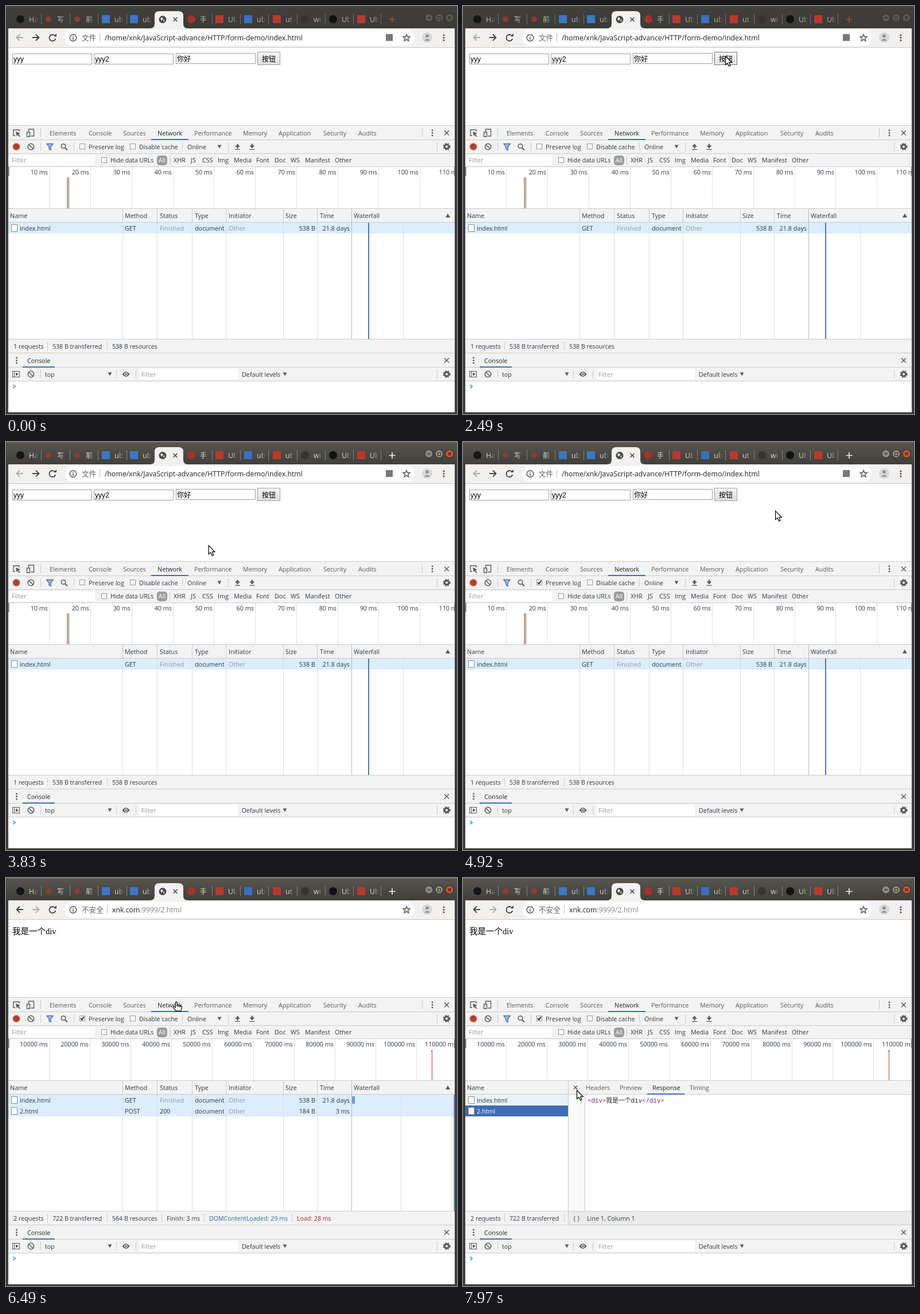
An HTML page with a canvas for the animation above (8000 ms loop, 786x712 px).

```html
<!DOCTYPE html>
<html>
<head>
<meta charset="utf-8">
<style>
html, body { margin: 0; width: 100%; height: 100%; overflow: hidden; background: #3c3b37; }
canvas { display: block; }
</style>
</head>
<body>
<canvas id="stage" width="786" height="712"></canvas>
<script>
const g = document.getElementById('stage').getContext('2d');
const CJK = '"Noto Sans CJK SC", "Noto Sans CJK JP", sans-serif';
const UI = '"Open Sans", ' + CJK;
const SANS = '"Liberation Sans", ' + CJK;
const SERIF = '"Liberation Serif", "Noto Sans CJK SC", serif';
const MONO = '"Noto Sans Mono", "Noto Sans CJK SC", monospace';
const INK = '#303942', ICON = '#5a5a5a', BAR = '#f3f3f3', EDGE = '#ccc', BLUE = '#3f6cb5';

function rect(x, y, w, h, color) {
  g.fillStyle = color;
  g.fillRect(x, y, w, h);
}
function frame(x, y, w, h, color) {
  g.strokeStyle = color;
  g.lineWidth = 1;
  g.strokeRect(x + .5, y + .5, w - 1, h - 1);
}
function round(x, y, w, h, r, color) {
  g.beginPath();
  g.roundRect(x, y, w, h, r);
  g.fillStyle = color;
  g.fill();
}
function disc(x, y, r, color) {
  g.beginPath();
  g.arc(x, y, r, 0, 7);
  g.fillStyle = color;
  g.fill();
}
function ring(x, y, r, color, width = 1.5, from = 0, to = 7) {
  g.beginPath();
  g.arc(x, y, r, from, to);
  g.strokeStyle = color;
  g.lineWidth = width;
  g.stroke();
}
function path(d, x, y, stroke, width = 1.5, fill) {
  const p = new Path2D(d);
  g.save();
  g.translate(x, y);
  if (fill) { g.fillStyle = fill; g.fill(p); }
  if (stroke) { g.strokeStyle = stroke; g.lineWidth = width; g.stroke(p); }
  g.restore();
}
function text(s, x, y, color = INK, size = 10.8, align = 'left', font = UI) {
  g.font = size + 'px ' + font;
  g.textAlign = align;
  g.fillStyle = color;
  g.fillText(s, x, y);
  return x + g.measureText(s).width;
}
const vline = (x, y, h, color = EDGE) => rect(x, y, 1, h, color);
const hline = (y, color = EDGE) => rect(4, y, 778, 1, color);

function gear(x, y) {
  ring(x, y, 3.6, ICON, 3);
  g.setLineDash([2.4, 2.1]);
  ring(x, y, 5.5, ICON, 2);
  g.setLineDash([]);
}
function dots(x, y, color = ICON) {
  for (const d of [-4.5, 0, 4.5]) disc(x, y + d, 1.4, color);
}
const cross = (x, y, r, color = ICON) => path(`M${-r} ${-r}L${r} ${r}M${r} ${-r}L${-r} ${r}`, x, y, color);
const caret = (x, y) => path('M-3.5 -3H3.5L0 3Z', x, y, null, 0, ICON);
function forbid(x, y) {
  ring(x, y, 5.2, ICON);
  path('M-3.7 -3.7L3.7 3.7', x, y, ICON);
}
function checkbox(x, y, on) {
  round(x, y, 10, 10, 2, '#fafafa');
  frame(x, y, 10, 10, '#9a9a9a');
  if (on) path('M2 5L4.3 7.5L8 2', x, y, '#222', 1.8);
}

// Title strip: [icon centre, title, icon colour, icon is square]
const tabs = [
  [25, 'Ha', '#151515'], [74, '写', '#8e3c33'], [124, '前', '#8e3c33'],
  [174, 'ub', '#3a78c8', 1], [223, 'ub', '#3a78c8', 1], [323, '手', '#a8322a'],
  [372, 'Ub', '#b83a2e', 1], [422, 'ub', '#3b6fc0', 1], [472, 'ut', '#b83a2e', 1],
  [521, 'wi', '#353430'], [570, 'Ub', '#111'], [619, 'Ub', '#b83a2e', 1]
];

function titleBar(focused) {
  const bg = g.createLinearGradient(0, 0, 0, 39);
  bg.addColorStop(0, focused ? '#57554e' : '#403f3b');
  bg.addColorStop(1, focused ? '#403f3a' : '#3c3b37');
  rect(0, 0, 786, 39, bg);
  rect(0, 0, 786, 1, focused ? '#6b6963' : '#55544f');
  for (const [x, title, color, square] of tabs) {
    if (square) rect(x - 7, 16, 14, 14, color);
    else disc(x, 23, color == '#8e3c33' ? 5 : 7, color);
    const fade = g.createLinearGradient(x + 15, 0, x + 31, 0);
    fade.addColorStop(.35, focused ? '#dfdbd2' : '#bdbab2');
    fade.addColorStop(1, '#dfdbd200');
    g.save();
    g.beginPath();
    g.rect(x, 8, 32, 30);
    g.clip();
    text(title, x + 15, 28, fade, 12.5);
    g.restore();
  }
  for (const x of [61, 111, 160, 210, 359, 408, 457, 507, 556, 605, 653])
    vline(x, 14, 18, focused ? '#85827a' : '#716f69');
  path('M251 39Q259 39 259 31V17Q259 9 267 9H301Q309 9 309 17V31Q309 39 317 39Z', 0, 0, null, 0, '#f2f1f0');
  disc(273, 23.5, 6.5, '#4a4a4a');
  path('M-4 -2L-1 -4L1 -1L-2 2ZM1 1L4 0L2 4Z', 273, 23.5, null, 0, '#f2f1f0');
  cross(295, 23.5, 3.5, '#444');
  path('M-5.5 0H5.5M0 -5.5V5.5', 673, 23.5, focused ? '#eee' : '#a8443b', 1.7);
  for (const x of [737, 755, 773]) {
    disc(x, 20.5, 7.5, '#33322e');
    disc(x, 20.5, 6.5, focused ? (x == 773 ? '#d9502f' : '#8c897f') : '#595852');
  }
  const mark = '#35342f';
  path('M-3 0H3', 737, 20.5, mark);
  frame(752, 18, 6, 6, mark);
  cross(773, 20.5, 2.6, mark);
}

function addressBar(loaded) {
  rect(4, 39, 778, 33, '#f2f1f0');
  round(103, 42, 609, 27, 13.5, '#fff');
  hline(72, '#c9c8c6');
  const dark = '#444', pale = '#aaa';
  path('M6 0H-5M0 -5.5L-5.5 0L0 5.5', 24, 55, loaded ? dark : pale, 1.8);
  path('M-6 0H5M0 -5.5L5.5 0L0 5.5', 52, 55, loaded ? pale : dark, 1.8);
  ring(81, 55.5, 5.5, dark, 1.8, .3, 5.5);
  path('M2 -1H7V-6Z', 81, 54, null, 0, dark);
  ring(117, 55.5, 5.8, '#555', 1.4);
  rect(116.3, 54.5, 1.5, 4.5, '#555');
  rect(116.3, 52, 1.5, 1.5, '#555');
  if (loaded) {
    text('不安全', 132, 60, '#5f6368', 12.6);
    vline(176, 48, 14, '#bbb');
    const x = text('xnk.com', 185, 59.5, '#222', 12.3);
    text(':9999/2.html', x, 59.5, '#80868b', 12.3);
  } else {
    text('文件', 132, 60, '#5f6368', 12.6);
    vline(163, 48, 14, '#bbb');
    text('/home/xnk/JavaScript-advance/HTTP/form-demo/index.html', 172, 59.5, '#222', 12.3);
    rect(662, 49, 12, 12, '#75797e');
  }
  path('M0 -6L1.7 -2H6L2.6 .9L3.8 5.3L0 2.8L-3.8 5.3L-2.6 .9L-6 -2H-1.7Z', 698, 55.5, '#555', 1.4);
  disc(734, 55, 9, '#d8d8d8');
  disc(734, 52.3, 2.8, '#909090');
  path('M-5.2 5Q0 -1 5.2 5Z', 734, 55.5, null, 0, '#909090');
  dots(763, 55.5, '#444');
}

function page(loaded, hover) {
  rect(4, 73, 778, 135, '#fff');
  if (loaded) {
    text('我是一个div', 11, 97.5, '#000', 14.5, 'left', SERIF);
    return;
  }
  [[11, 83, 'yyy'], [153, 83, 'yyy2'], [296, 82, '你好']].forEach(([x, y, s]) => {
    frame(x, y, 139, 19, '#a0a0a0');
    text(s, x + 2, 97, '#000', 12, 'left', SANS);
  });
  const face = g.createLinearGradient(0, 80, 0, 103);
  face.addColorStop(0, '#f6f6f6');
  face.addColorStop(1, hover ? '#e4e4e4' : '#dcdcdc');
  round(438, 80, 40, 23, 2, face);
  frame(438, 80, 40, 23, hover ? '#777' : '#a2a2a2');
  text('按钮', 458, 96.5, '#000', 12, 'center', SANS);
}

function toolbars(checked) {
  rect(4, 208, 778, 73, BAR);
  for (const y of [208, 233, 257, 280]) hline(y);

  path('M3 10H0V0H10V3', 13, 216, ICON, 1.4);
  path('M0 0L8 3.5L4.8 5L7.8 8.5L6.3 9.6L3.4 6L1.8 8.5Z', 17, 219, null, 0, ICON);
  path('M3 4V0H12V12H7M0 5H5V13H0Z', 36.5, 215, ICON, 1.4);
  vline(60, 214, 15);
  [['Elements', 76], ['Console', 144], ['Sources', 204], ['Network', 264], ['Performance', 328],
   ['Memory', 413], ['Application', 475], ['Security', 553], ['Audits', 614]]
    .forEach(([s, x]) => text(s, x, 226, s == 'Network' ? '#222' : '#5a5a5a'));
  rect(253, 232, 65, 2, BLUE);
  vline(725, 214, 15);
  dots(743, 221.5);
  cross(768, 221.5, 4);

  disc(18, 245.5, 7, '#e3b7b0');
  disc(18, 245.5, 5.8, '#b5402f');
  forbid(43.5, 245.5);
  vline(60, 238, 15);
  path('M-5.5 -5H5.5L1.5 0V6L-1.5 4V0Z', 76.5, 245.5, BLUE, 1.4, '#a9c6ee');
  ring(100, 244.5, 3.8, ICON);
  path('M3 3L7 7', 100, 244.5, ICON, 2);
  vline(118, 238, 15);
  checkbox(128, 240, checked);
  text('Preserve log', 144, 250);
  checkbox(216, 240);
  text('Disable cache', 232, 250, INK, 10.6);
  vline(307, 238, 15);
  text('Online', 316, 250);
  caret(372, 245.5);
  vline(387, 238, 15);
  const upload = 'M0 -5L4.5 0H1.3V3H-1.3V0H-4.5ZM-4.5 4.2H4.5V5.6H-4.5Z';
  path(upload, 403.5, 245.5, null, 0, ICON);
  path('M0 3L4.5 -2H1.3V-5H-1.3V-2H-4.5ZM-4.5 4.2H4.5V5.6H-4.5Z', 429, 245.5, null, 0, ICON);
  vline(751, 238, 15);
  gear(768, 245.5);

  rect(4, 260, 151, 18, '#fff');
  text('Filter', 10, 273, '#999');
  checkbox(166, 264);
  text('Hide data URLs', 182, 273, INK, 10.6);
  round(263, 261, 18, 17, 5, '#9b9b9b');
  text('All', 272, 273, '#fff', 10.8, 'center');
  vline(285, 262, 15);
  [['XHR', 292], ['JS', 322], ['CSS', 342], ['Img', 369], ['Media', 397], ['Font', 436],
   ['Doc', 468], ['WS', 496], ['Manifest', 521], ['Other', 573]].forEach(([s, x]) => text(s, x, 273));
}

function overview(loaded, guide) {
  rect(4, 281, 778, 72, '#fff');
  g.save();
  g.beginPath();
  g.rect(4, 281, 777, 72);
  g.clip();
  const gap = loaded ? 71.2 : 71.8;
  for (let i = 1; i < 12; i++) {
    const x = Math.round(3.3 + gap * i);
    vline(x, 281, 72, '#e1e1e1');
    text(i * (loaded ? 10000 : 10) + ' ms', x - 2, 294, INK, 10.8, 'right');
  }
  g.restore();
  rect(4, 281, 2, 16, '#999');
  rect(781, 281, 1, 16, '#999');
  if (loaded) {
    rect(742, 300, 1, 53, '#b5402f');
    rect(741, 301, 1, 2, '#777');
  } else {
    rect(106.5, 299, 1.3, 54, '#b04a44');
    vline(109, 299, 54, '#666');
  }
  if (guide) rect(guide - .7, 281, 1.6, 72, '#5b9bd5');
  hline(353);
}

function fileRow(y, cells, fill, ink) {
  rect(4, y, cells.length > 1 ? 778 : 179, 19, fill);
  rect(9, y + 3, 11, 13, '#fff');
  frame(9, y + 3, 11, 13, '#8e9296');
  const at = [24, 207, 268, 329, 388, 539, 599];
  cells.forEach((s, i) =>
    text(s, at[i], y + 13.5, /Fin|Oth/.test(s) ? '#999' : ink, 10.8, i > 4 ? 'right' : 'left'));
}

function requests(loaded, detail) {
  rect(4, 354, 778, 227, '#fff');
  rect(4, 354, 778, 23, BAR);
  const first = ['index.html', 'GET', 'Finished', 'document', 'Other', '538 B', '21.8 days'];
  const second = ['2.html', 'POST', '200', 'document', 'Other', '184 B', '3 ms'];
  text('Name', 7, 369.5);
  if (detail) {
    fileRow(378, first.slice(0, 1), '#e6f4f5', INK);
    fileRow(397, second.slice(0, 1), BLUE, '#fff');
    hline(377);
    response();
    return;
  }
  [['Method', 207], ['Status', 268], ['Type', 329], ['Initiator', 388], ['Size', 487],
   ['Time', 547], ['Waterfall', 606]].forEach(([s, x]) => text(s, x, 369.5));
  path('M-4 3H4L0 -4Z', 770, 366, null, 0, ICON);
  hline(377);
  fileRow(378, first, '#dcedfe', INK);
  if (loaded) fileRow(397, second, '#dcedfe', INK);
  for (const x of [203, 263, 324, 383, 483, 542]) {
    vline(x, 354, 23);
    vline(x, 378, 203, '#dedede');
  }
  vline(602, 354, 227, '#bbb');
  if (loaded) {
    vline(688, 378, 203, '#dedede');
    vline(776, 378, 203, '#dedede');
    rect(603, 381, 5, 13, '#6c9fd6');
    rect(780.5, 378, 2, 203, '#4a78bd');
  } else {
    vline(692, 378, 203, '#dedede');
    rect(631, 378, 2, 203, '#4a78bd');
  }
}

function response() {
  vline(183, 354, 251);
  cross(196, 365.5, 3);
  [['Headers', 214], ['Preview', 273], ['Response', 330], ['Timing', 395]]
    .forEach(([s, x]) => text(s, x, 370, s == 'Response' ? '#222' : '#5a5a5a'));
  rect(321, 376, 65, 2, BLUE);
  rect(184, 378, 28, 203, '#fafafa');
  vline(212, 378, 203);
  text('1', 209, 391.5, '#999', 10.8, 'right', MONO);
  let x = 217;
  [['<div>', '#7a1f78'], ['我是一个div', '#222'], ['</div>', '#7a1f78']].forEach(([s, color]) => {
    x = text(s, x, 391.5, color, 10.8, 'left', MONO);
  });
}

function summary(loaded, timed, detail) {
  rect(4, 581, 778, 25, BAR);
  hline(581);
  text(loaded ? '2 requests' : '1 requests', 13, 598);
  vline(72, 586, 15);
  text(loaded ? '722 B transferred' : '538 B transferred', 81, 598, INK, 10.6);
  vline(176, 586, 15);
  if (detail) {
    rect(184, 582, 598, 23, '#ebebeb');
    vline(183, 582, 23);
    text('{ }', 192, 598, ICON, 11.5);
    text('Line 1, Column 1', 216, 598);
  } else {
    text(loaded ? '564 B resources' : '538 B resources', 185, 598, INK, 10.6);
    if (timed) {
      for (const x of [271, 345, 498]) vline(x, 586, 15);
      text('Finish: 3 ms', 280, 598, INK, 10.6);
      text('DOMContentLoaded: 29 ms', 354, 598, '#2a66b8', 10.6);
      text('Load: 28 ms', 507, 598, '#9c2c22', 10.6);
    }
  }
}

function drawer() {
  rect(4, 606, 778, 49, BAR);
  for (const y of [605, 630, 654]) hline(y);
  dots(18.5, 618.5);
  text('Console', 37, 622.5, '#222');
  rect(29, 629, 56, 2, BLUE);
  cross(768, 618.5, 4);
  frame(11, 637, 13, 11, ICON);
  vline(14, 637, 11, ICON);
  path('M0 -3L5 0L0 3Z', 17, 642.5, null, 0, ICON);
  forbid(43.5, 642.5);
  for (const x of [60, 192, 226, 751]) vline(x, 635, 15);
  text('top', 68, 647);
  caret(181, 642.5);
  path('M-6.5 0Q0 -8.5 6.5 0Q0 8.5 -6.5 0Z', 209, 642.5, null, 0, ICON);
  disc(209, 642.5, 2.8, BAR);
  disc(209, 642.5, 1.6, ICON);
  rect(233, 633, 171, 19, '#fff');
  text('Filter', 236, 647, '#999');
  text('Default levels', 411, 647);
  caret(486, 642.5);
  gear(768, 642.5);
  rect(4, 655, 778, 54, '#fff');
  path('M0 -3L3.5 0L0 3', 12.5, 664, '#3b80d8', 1.6);
}

// Pointer hot spot: [time, x, y]
const track = [
  [810, 762, 330], [1260, 476, 285], [1400, 428, 240], [1580, 402, 202], [1620, 402, 202],
  [1760, 348, 172], [1900, 391, 142], [2090, 391, 142], [2490, 457, 87], [2660, 457, 87],
  [3300, 131, 251], [3570, 131, 251], [3830, 353, 180], [4370, 131, 242], [4650, 131, 242],
  [4920, 544, 120], [4990, 548, 112], [5240, 458, 88], [5400, 458, 92], [5520, 469, 97],
  [6200, 469, 97], [6490, 297, 216], [6700, 150, 340], [6850, 52, 415], [6970, 46, 405],
  [7550, 46, 405], [7650, 15, 424], [7800, 105, 402], [7970, 198, 370], [8001, 198, 370]
];
function pointer(t) {
  const i = track.findIndex(k => k[0] > t);
  if (i < 1) return null;
  const [t0, x0, y0] = track[i - 1], [t1, x1, y1] = track[i];
  const p = (t - t0) / (t1 - t0);
  return [x0 + (x1 - x0) * p, y0 + (y1 - y0) * p];
}
function drawPointer([x, y], loaded) {
  const overTab = y > 209 && y < 233 && x > 66 && x < 655;
  const overRow = loaded && y > 378 && y < 416;
  if (y > 281 && y < 353)
    path('M5 16.5L.8 10Q1.5 7.5 4.5 10L2.8 4.5Q4 2 6 4.5L6.5 1.5Q8.5 0 9.3 2.5L10 1.5Q12.5 .5 12.8 4Q16.5 2.5 16 7L14 16.5ZM6 4.5L7 8M9.3 2.5V8M12.8 4L12 8',
      x - 8, y - 8, '#000', 1.2, '#fff');
  else if (overTab || overRow)
    path('M5 1.5Q6.5 -.5 8 1.5V6L14.5 7.5Q16.5 8 16 11L14.5 16.5H6L1 10.5Q.5 8 3 8.8L5 10.5ZM8 6V9M10.5 6.7V9.5M13 7.3V10',
      x - 6, y - 1, '#000', 1.2, '#fff');
  else
    path('M.5 .5V15.5L4 12.5L6.5 18L9 17L6.7 11.5H11.3Z', x, y, '#000', 1.2, '#fff');
}

function draw(now) {
  const t = now % 8000;
  const loaded = t >= 5800, detail = t >= 7310;
  const at = pointer(t), before = pointer(t - 45);
  const hover = at && at[0] >= 438 && at[0] < 478 && at[1] >= 80 && at[1] < 103;
  const guide = at && at[1] > 281 && at[1] < 353 && (before || [772])[0];
  rect(0, 0, 786, 712, '#3f3e3a');
  titleBar(t >= 3570);
  addressBar(loaded);
  page(loaded, hover);
  toolbars(t >= 4650);
  overview(loaded, guide);
  requests(loaded, detail);
  summary(loaded, t >= 5920, detail);
  drawer();
  if (at) drawPointer(at, loaded);
  requestAnimationFrame(draw);
}
requestAnimationFrame(draw);
</script>
</body>
</html>
```
